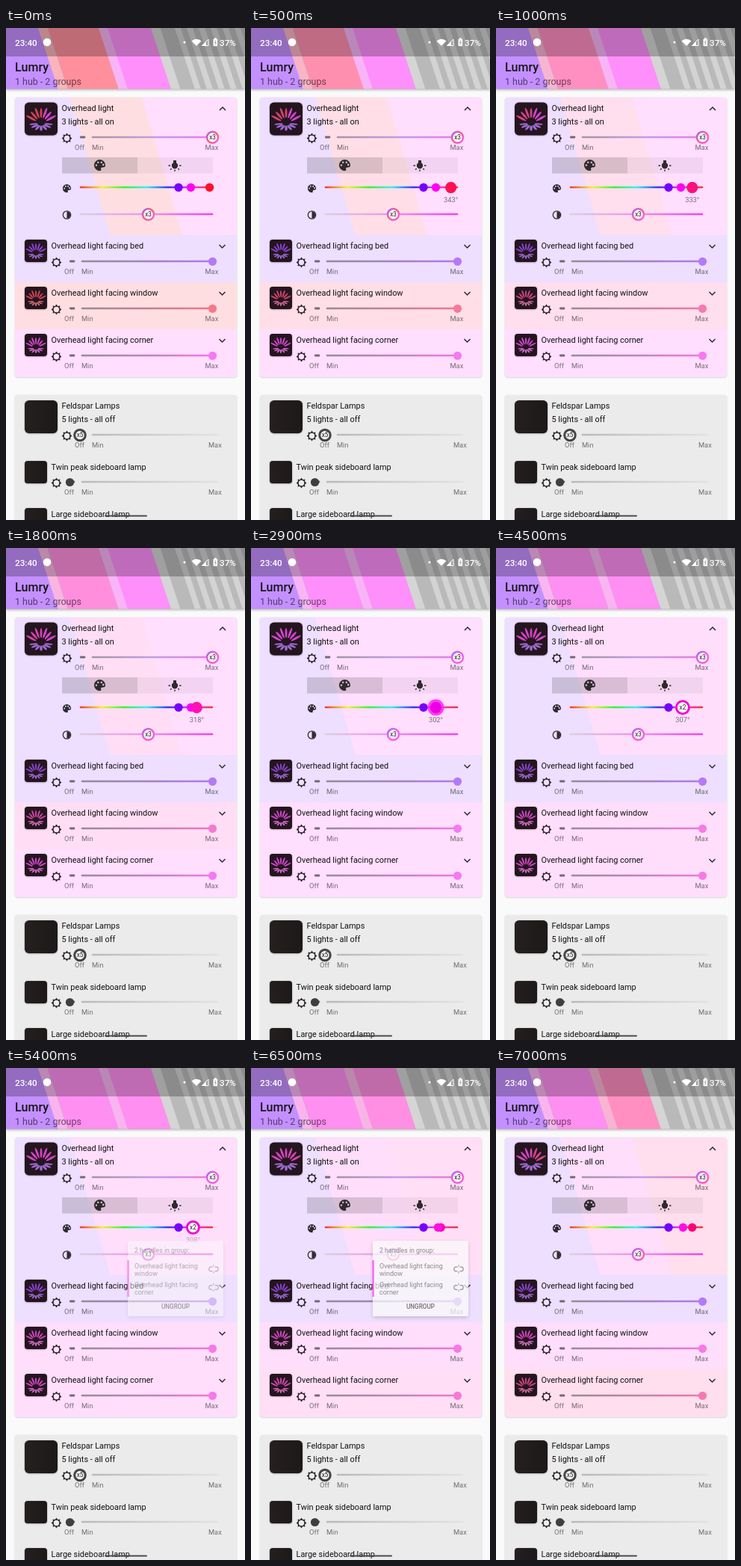
These frames come from a looping animation (320x658 px, 7.7 s). An HTML page with a canvas:

```html
<!DOCTYPE html>
<html lang="en">
<head>
<meta charset="utf-8">
<title>Light control</title>
<style>
  html, body { margin: 0; width: 100%; height: 100%; overflow: hidden; background: #fafafa; }
  canvas { display: block; width: 320px; height: 658px; }
</style>
</head>
<body>
<canvas id="stage"></canvas>
<script>
const W = 320, H = 658, LOOP = 7700, STEP = 100, TAU = Math.PI * 2;
const BED = 268.5, CORNER = 302, JOINED = 308;
const INK = '#2e2a2e', SOFT = 'rgba(0,0,0,.52)';
const canvas = document.getElementById('stage');
const c = canvas.getContext('2d');
const dpr = window.devicePixelRatio || 1;
canvas.width = W * dpr;
canvas.height = H * dpr;

const clamp = v => Math.max(0, Math.min(1, v));
const ramp = (t, a, b) => clamp((t - a) / (b - a));
const easeOut = p => 1 - (1 - p) ** 2;
const hsl = (h, l, a = 1, s = 100) => `hsla(${h},${s}%,${l}%,${a})`;
const hueX = h => 99 + h * 177 / 360;

// Linear interpolation through [time, value] points
function track(t, points) {
  for (let i = 1; i < points.length; i++) {
    const [t0, v0] = points[i - 1], [t1, v1] = points[i];
    if (t < t1) return v0 + (v1 - v0) * ramp(t, t0, t1);
  }
  return points[points.length - 1][1];
}

function rect(x, y, w, h, fill, r = 0) {
  c.fillStyle = fill;
  c.beginPath();
  c.roundRect(x, y, w, h, r);
  c.fill();
}

function disc(x, y, r, fill) {
  c.fillStyle = fill;
  c.beginPath();
  c.arc(x, y, r, 0, TAU);
  c.fill();
}

function line(points, stroke, width, cap = 'butt') {
  c.strokeStyle = stroke;
  c.lineWidth = width;
  c.lineCap = cap;
  c.beginPath();
  points.forEach(([x, y], i) => i ? c.lineTo(x, y) : c.moveTo(x, y));
  c.stroke();
}

function poly(points, fill) {
  c.fillStyle = fill;
  c.beginPath();
  points.forEach(([x, y]) => c.lineTo(x, y));
  c.closePath();
  c.fill();
}

function slant(x0, x1, y, h, lean, fill) {
  poly([[x0, y], [x1, y], [x1 + lean, y + h], [x0 + lean, y + h]], fill);
}

// y is the middle of the capital letters
function text(s, x, y, size, fill = '#111', weight = 400, align = 'left') {
  c.font = `${weight} ${size}px Roboto, sans-serif`;
  c.textAlign = align;
  c.fillStyle = fill;
  c.fillText(s, x, Math.round(y + size * 0.36));
}

function fade(x0, x1, colors) {
  const g = c.createLinearGradient(x0, 0, x1, 0);
  colors.forEach((col, i) => g.addColorStop(i / (colors.length - 1), col));
  return g;
}

function shadowed(draw, blur, dy, alpha) {
  c.save();
  c.shadowColor = `rgba(0,0,0,${alpha})`;
  c.shadowBlur = blur * dpr;
  c.shadowOffsetY = dy * dpr;
  draw();
  c.restore();
}

// ---- icons ----

function sun(x, y) {
  c.fillStyle = INK;
  c.beginPath();
  for (let i = 0; i < 16; i++) {
    const r = i % 2 ? 5 : 6.9, a = i * TAU / 16;
    c.lineTo(x + r * Math.cos(a), y + r * Math.sin(a));
  }
  c.closePath();
  c.moveTo(x + 3.7, y);
  c.arc(x, y, 3.7, 0, TAU);
  c.fill('evenodd');
}

function palette(x, y, r) {
  c.fillStyle = INK;
  c.beginPath();
  c.moveTo(x + r, y - r * 0.05);
  c.bezierCurveTo(x + r, y + r * 0.7, x + r * 0.2, y + r * 0.15, x + r * 0.2, y + r * 0.65);
  c.bezierCurveTo(x + r * 0.4, y + r * 0.9, x, y + r, x, y + r);
  c.arc(x, y, r, TAU / 4, TAU * 0.99);
  c.closePath();
  for (const [dx, dy] of [[-0.6, 0], [-0.3, -0.5], [0.3, -0.5], [0.62, -0.08]]) {
    c.moveTo(x + (dx + 0.17) * r, y + dy * r);
    c.arc(x + dx * r, y + dy * r, r * 0.17, 0, TAU);
  }
  c.fill('evenodd');
}

function bulb(x, y) {
  disc(x, y + 1, 4.2, INK);
  rect(x - 2, y - 6, 4, 4, INK);
  line([[x, y + 6.5], [x, y + 8.6]], INK, 1.6);
  for (const s of [-1, 1]) {
    line([[x + s * 6, y + 1], [x + s * 8.5, y + 1]], INK, 1.6);
    line([[x + s * 4.4, y + 5], [x + s * 5.9, y + 6.5]], INK, 1.6);
  }
}

function contrast(x, y) {
  c.strokeStyle = c.fillStyle = INK;
  c.lineWidth = 1.3;
  c.beginPath();
  c.arc(x, y, 5.2, 0, TAU);
  c.stroke();
  c.beginPath();
  c.arc(x, y, 4.6, -TAU / 4, TAU / 4);
  c.fill();
}

function chevron(x, y, dir) {
  line([[x - 4, y - 2 * dir], [x, y + 2 * dir], [x + 4, y - 2 * dir]], INK, 1.5);
}

// Two halves of a chain link with ticks in the gap
function unlink(x, y) {
  c.lineCap = 'butt';
  for (const s of [-1, 1]) {
    c.strokeStyle = '#777';
    c.lineWidth = 1.2;
    c.beginPath();
    c.moveTo(x + s * 1.6, y - 2.8);
    c.arc(x + s * 3.4, y, 2.8, -TAU / 4, TAU / 4, s < 0);
    c.lineTo(x + s * 1.6, y + 2.8);
    c.stroke();
    line([[x, y + s * 3.2], [x, y + s * 5.6]], '#777', 1);
  }
}

// A few petals stand for the lamp picture
function picture(x, y, size, hues) {
  shadowed(() => rect(x, y, size, size, '#24151f', size * 0.13), 2, 0.5, 0.4);
  c.save();
  c.translate(x + size / 2, y + size * 0.64);
  c.scale(size, size);
  const petal = (a, from, len, w, fill) => {
    c.save();
    c.rotate(a);
    c.fillStyle = fill;
    c.beginPath();
    c.ellipse(0, -from - len / 2, w, len / 2, 0, 0, TAU);
    c.fill();
    c.restore();
  };
  for (let i = 0; i < 7; i++) {
    const hue = hues[(i < 4 ? 1 : 2) % hues.length];
    petal((i - 3) * 0.36, 0.17, i % 2 ? 0.3 : 0.34, 0.034, hsl(hue, 62, 0.85, 85));
  }
  c.scale(1, 0.62);
  for (let i = 0; i < 7; i++) {
    petal(1.7 + i * 0.48, 0.1, 0.26, 0.04, hsl(hues[0], 72, 0.85, 85));
  }
  c.restore();
}

function darkPicture(x, y, size) {
  const fill = fade(x, x + size, ['#25201f', '#1c1918']);
  shadowed(() => rect(x, y, size, size, fill, size * 0.13), 2, 0.5, 0.4);
}

// ---- controls ----

function ringThumb(x, y, label, colors, r = 7.5, width = 2.5, fill = '#fdf4fb') {
  disc(x, y, r + 1, fill);
  const g = c.createLinearGradient(x - r, y - r, x + r, y + r);
  colors.forEach((col, i) => g.addColorStop(colors.length > 1 ? i / (colors.length - 1) : 0, col));
  c.strokeStyle = g;
  c.lineWidth = width;
  c.beginPath();
  c.arc(x, y, r, 0, TAU);
  c.stroke();
  text(label, x, y, 8.2, '#222', 400, 'center');
}

function slider(x, y, end, maxX, colors) {
  sun(x - 17.5, y + 1.5);
  line([[x + 1.3, y], [x + 6, y]], '#746b74', 2.8, 'round');
  line([[x + 17, y], [end, y]], fade(x + 17, end, colors), 2.6, 'round');
  text('Off', x - 7, y + 14, 9.3, SOFT);
  text('Min', x + 16, y + 14, 9.3, SOFT);
  text('Max', maxX, y + 14, 9.3, SOFT);
}

function lightRow(y, name, hue) {
  rect(12, y, 297, 63.5, hsl(hue, 93.5));
  picture(25, y + 6, 30, [hue]);
  text(name, 60.5, y + 14.5, 10.93);
  chevron(289.5, y + 15, 1);
  slider(85, y + 35, 277, 266.5, ['#958c95', hsl(hue, 70, 1, 75)]);
  disc(276.5, y + 35.3, 5.6, hsl(hue, 72, 1, 88));
}

function statusBar() {
  rect(0, 0, W, 38, 'rgba(0,0,0,.25)');
  text('23:40', 12, 19.5, 11.7, '#fff', 500);
  disc(55, 19, 5.3, '#fff');
  disc(239, 19, 1.6, '#fff');
  c.fillStyle = '#fff';
  c.beginPath();
  c.moveTo(255, 24);
  c.arc(255, 24, 9.2, -TAU * 0.375, -TAU * 0.125);
  c.fill();
  line([[271, 15], [271, 23.5], [262.5, 23.5], [271, 15]], '#fff', 1);
  poly([[268, 18], [268, 24], [262, 24]], '#fff');
  rect(277.5, 14.5, 5.6, 9.8, '#fff', 1);
  rect(279, 13.3, 2.6, 2, '#fff');
  line([[280.8, 16.5], [279.4, 19.6], [281.3, 19.6], [279.9, 22.5]], '#888', 0.8);
  text('37%', 286, 19.5, 11.7, '#fff', 500);
}

function header(hues) {
  shadowed(() => rect(0, 0, W, 81.5, '#b9b9b9'), 3, 1, 0.28);
  c.save();
  c.beginPath();
  c.rect(0, 0, W, 81.5);
  c.clip();
  const edges = [-40, 56, 136], ends = [43, 124, 194];
  hues.forEach((h, i) => {
    slant(edges[i], ends[i], 0, 82, 27, hsl(h, 78));
    slant(ends[i], ends[i] + 12.5, 0, 82, 27, i < 2 ? hsl(hues[i + 1], 84, 1, 85) : '#d5d5d5');
  });
  for (let i = 0; i < 6; i++) slant(226 + i * 16, 234 + i * 16, 0, 82, 27, '#d3d3d3');
  c.restore();
  statusBar();
  text('Lumry', 12, 52.5, 16, '#151515', 500);
  text('1 hub - 2 groups', 12, 71.5, 12.45, 'rgba(0,0,0,.58)');
}

function hueHandles(s) {
  const { window: win, corner, drag, label } = s;
  const x = hueX(win);
  disc(hueX(BED), 213.3, 5.7, hsl(BED, 50));
  if (s.grouped) {
    ringThumb(x, 213.3, 'x2', [hsl(win, 48)], 7.5 + drag, 3, '#fff');
  } else {
    disc(hueX(corner), 213.3, 5.7, hsl(corner, 50));
    if (s.halo > 0) disc(x, 213.3, 7 + 4 * s.halo, hsl(win, 56, 0.85));
    disc(x, 213.3, 5.7 + 1.9 * drag, hsl(win, s.halo > 0 ? 46 : 53));
  }
  if (label > 0) {
    c.globalAlpha = label;
    text(Math.round(win) + '°', x, 229.5, 9.3, SOFT, 400, 'center');
    c.globalAlpha = 1;
  }
}

function groupPanel(hues) {
  const ringColors = hues.map(h => hsl(h, 67, 1, 90));
  c.save();
  c.beginPath();
  c.rect(12, 93, 297, 185);
  c.clip();
  const edges = [-60, 86, 182, 330];
  hues.forEach((h, i) => slant(edges[i], edges[i + 1] + 0.5, 93, 185, 54, hsl(h, 93.5)));
  c.restore();

  picture(25, 99.5, 44, hues);
  text('Overhead light', 74.5, 107.5, 10.93);
  text('3 lights - all on', 74.5, 125.5, 10.93);
  chevron(290, 108, -1);
  slider(99, 146, 277, 266.5, ['#a298a2', hsl(hues[0], 76, 1, 60), hsl(hues[2], 70, 1, 75)]);
  ringThumb(276.5, 146.3, 'x3', ringColors);

  rect(75, 173, 101, 21.5, 'rgba(40,40,40,.18)');
  rect(176, 173, 101, 21.5, 'rgba(40,40,40,.06)');
  palette(125.5, 183.5, 7.6);
  bulb(226, 183);

  palette(81.5, 214.5, 5.6);
  const rainbow = Array.from({ length: 13 }, (_, i) => hsl(i * 30, 58, 1, 88));
  line([[100, 213], [276, 213]], fade(99, 277, rainbow), 2.6, 'round');
  contrast(81.5, 250);
  line([[100, 249], [276, 249]],
    fade(99, 277, ['#dccfdc', hsl(298, 76, 1, 75), hsl(302, 60, 1, 85)]), 2.6, 'round');
  ringThumb(190.5, 249.3, 'x3', ringColors);
}

function popup(alpha, hue) {
  if (alpha <= 0) return;
  c.save();
  c.globalAlpha = alpha;
  // Keep the shadow outside, so that it does not darken the translucent sheet
  c.save();
  c.beginPath();
  c.rect(0, 0, W, H);
  c.roundRect(163, 231, 128, 101, 2);
  c.clip('evenodd');
  shadowed(() => rect(163, 231, 128, 101, '#fafafa', 2), 5, 2, 0.3 * alpha);
  c.restore();
  rect(163, 231, 128, 101, '#fafafa', 2);
  rect(162.5, 257, 2.2, 49, hsl(hue, 60));
  text('2 handles in group:', 172, 244, 8.75, '#666');
  ['window', 'corner'].forEach((name, i) => {
    const y = 265 + i * 24.5;
    text('Overhead light facing', 172, y, 9, '#666');
    text(name, 172, y + 9.8, 9, '#666');
    unlink(278, y + 4);
  });
  text('UNGROUP', 227, 319, 8.2, '#444', 500, 'center');
  c.restore();
}

function lampCard() {
  shadowed(() => rect(12, 491, 297, 180, '#ebebeb', 4), 2, 0.5, 0.22);
  const grey = ['#b9b9b9', '#cfcfcf', '#e2e2e2'];
  darkPicture(25, 498, 44);
  text('Feldspar Lamps', 74.5, 505.5, 10.93);
  text('5 lights - all off', 74.5, 523.5, 10.93);
  slider(99, 544, 283, 271, grey);
  ringThumb(99, 544.5, 'x5', ['#444'], 7.3, 3, '#f0f0f0');
  darkPicture(25, 579, 30);
  text('Twin peak sideboard lamp', 60.5, 587, 10.93);
  slider(85, 607, 283, 271, grey);
  disc(85.5, 607.5, 5.6, '#403e40');
  darkPicture(25, 642, 30);
  text('Large sideboard lamp', 60.5, 650, 10.93);
}

// ---- state over time ----

function stateAt(t) {
  const grouped = t >= 4000 && t < 6500;
  const dragHue = track(t, [[0, 353], [1000, 333], [1800, 318], [2800, CORNER],
    [4000, CORNER], [4600, JOINED]]);
  const corner = t < 4000 ? CORNER
    : t < 6500 ? dragHue
    : JOINED + 25 * easeOut(ramp(t, 6400, 7000));
  const release = 1 - ramp(t, 5300, 5500);
  return {
    grouped, corner,
    window: dragHue,
    drag: ramp(t, 0, 200) * release,
    label: ramp(t, 0, 200) * release,
    halo: t < 4000 ? ramp(t, 2600, 2900) : 0,
    popup: ramp(t, 5200, 5600) * (1 - ramp(t, 6400, 6800))
  };
}

function draw(t) {
  const s = stateAt(t), hues = [BED, s.window, s.corner];
  c.setTransform(dpr, 0, 0, dpr, 0, 0);
  rect(0, 0, W, H, '#fafafa');
  header(hues);
  shadowed(() => rect(12, 93, 297, 374, '#fbe2fb', 4), 2, 0.5, 0.22);
  c.save();
  c.beginPath();
  c.roundRect(12, 93, 297, 374, 4);
  c.clip();
  groupPanel(hues);
  ['bed', 'window', 'corner'].forEach((name, i) =>
    lightRow(277 + i * 63, 'Overhead light facing ' + name, hues[i]));
  hueHandles(s);
  c.restore();
  popup(s.popup, s.window);
  lampCard();
  line([[133, 652.5], [188, 652.5]], '#4a4a4a', 2, 'round');
}

const start = performance.now();
function tick() {
  const t = (performance.now() - start) % LOOP;
  draw(Math.floor(t / STEP) * STEP);
  requestAnimationFrame(tick);
}
tick();
</script>
</body>
</html>
```
